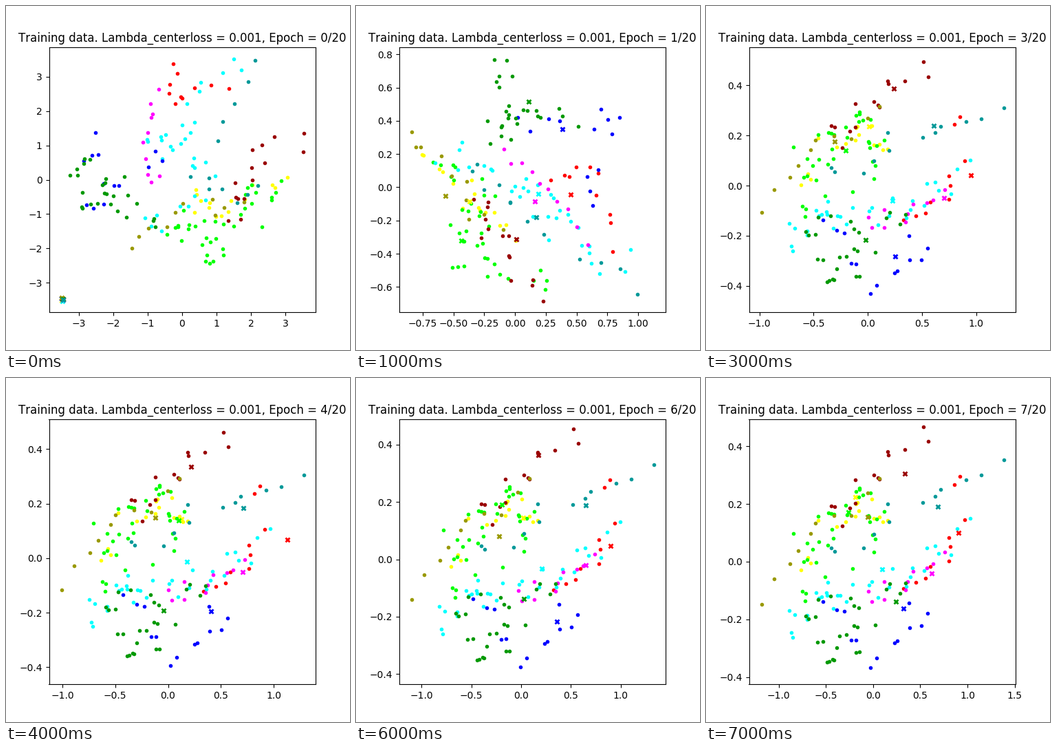
A matplotlib script that plays this animation: 500x500 px, repeating every 8 s.

```python
import numpy as np
import matplotlib.pyplot as plt
from matplotlib.animation import FuncAnimation
from matplotlib.transforms import Affine2D

plt.rcParams["text.kerning_factor"] = 6

EPOCHS = 8

# Colour and number of samples of each class, in drawing order
CLASSES = {
    "red": ("#ff0000", 10), "yellow": ("#ffff00", 15),
    "lime": ("#00ff00", 35), "cyan": ("#00ffff", 32),
    "blue": ("#0000ff", 13), "magenta": ("#ff00ff", 10),
    "maroon": ("#990000", 14), "olive": ("#999900", 10),
    "green": ("#009900", 26), "teal": ("#009999", 12),
}

# Key points of the path each class gathers along, outermost sample first.
# Stage pixels, y downwards.
START = {
    "red": [(242, 83), (243, 145), (320, 110)],
    "yellow": [(408, 248), (310, 300), (258, 258)],
    "lime": [(399, 253), (320, 315), (295, 355), (235, 300)],
    "cyan": [(341, 92), (215, 185), (285, 235), (215, 330)],
    "blue": [(129, 183), (130, 295), (232, 210)],
    "magenta": [(221, 120), (205, 190), (215, 265)],
    "maroon": [(432, 184), (340, 245), (330, 310)],
    "olive": [(182, 351), (260, 295), (345, 292)],
    "green": [(113, 221), (125, 285), (150, 262), (215, 325)],
    "teal": [(361, 78), (270, 262), (370, 270)],
}
SPREAD = {
    "red": [(372, 356), (345, 225), (290, 255)],
    "yellow": [(95, 215), (170, 285), (225, 330)],
    "lime": [(274, 411), (150, 365), (185, 300), (130, 215)],
    "cyan": [(390, 385), (295, 312), (245, 260), (130, 200)],
    "blue": [(343, 289), (370, 160), (245, 165)],
    "magenta": [(336, 346), (275, 255), (225, 215)],
    "maroon": [(271, 428), (205, 345), (180, 280)],
    "olive": [(80, 182), (145, 255), (205, 325)],
    "green": [(200, 77), (248, 150), (195, 180), (330, 160)],
    "teal": [(408, 418), (245, 295), (160, 235)],
}
SETTLED = {
    "red": [(368, 156), (350, 275), (285, 318)],
    "yellow": [(137, 264), (215, 175), (275, 195)],
    "lime": [(139, 295), (160, 215), (230, 165), (230, 250)],
    "cyan": [(123, 354), (175, 295), (270, 308), (380, 230)],
    "blue": [(169, 314), (245, 418), (325, 335)],
    "magenta": [(346, 263), (280, 302), (230, 328)],
    "maroon": [(315, 78), (245, 150), (180, 198)],
    "olive": [(80, 307), (165, 215), (245, 152)],
    "green": [(162, 310), (185, 400), (210, 352), (280, 305)],
    "teal": [(432, 140), (285, 195), (170, 250)],
}

# x and y limits of the axes at the key epochs
LIMITS = {
    0: (-3.86, 3.87, -3.86, 3.86),
    1: (-0.943, 1.223, -0.752, 0.843),
    2: (-1.065, 1.327, -0.547, 0.594),
    4: (-1.127, 1.397, -0.462, 0.509),
    6: (-1.227, 1.452, -0.435, 0.488),
    7: (-1.3136, 1.5097, -0.425, 0.494),
}


def gather(paths, seed):
    """Seeded samples around each class path; the first one stays on it."""
    rng = np.random.default_rng(seed)
    groups = {}
    for name, (_, count) in CLASSES.items():
        xs, ys = zip(*paths[name])
        along = np.linspace(0, len(xs) - 1, count)
        steps = np.arange(len(xs))
        line = np.column_stack([np.interp(along, steps, xs),
                                np.interp(along, steps, ys)])
        noise = np.clip(rng.normal(0, 1, line.shape), -1.6, 1.6)
        noise[0] = 0
        groups[name] = line + 3 * np.sqrt(count) * noise
    return groups


start, spread, settled = (gather(paths, seed) for seed, paths
                          in enumerate((START, SPREAD, SETTLED)))


def samples_at(epoch):
    if epoch < 2:
        return (start, spread)[epoch]
    # the settled cloud tilts slowly, its right side rising
    tilt = np.array([[1, 0.04 * (4 - epoch)], [0, 1]])
    pivot = (256, 252)
    return {name: (xy - pivot) @ tilt + pivot for name, xy in settled.items()}


def centers_at(epoch, groups):
    """Centres start in one corner, then wander beside their class means."""
    rng = np.random.default_rng(40 + epoch)
    wander = np.clip(rng.normal(0, 1, (len(CLASSES), 2)), -1.6, 1.6)
    if epoch == 0:
        return (82, 426) + 1.5 * wander
    means = np.array([xy.mean(axis=0) for xy in groups.values()])
    lead = (0, 0) if epoch == 1 else (40, -18)
    return means + lead + wander * (20, 14)


def limits_at(epoch):
    keys = sorted(LIMITS)
    return [np.interp(epoch, keys, [LIMITS[k][i] for k in keys])
            for i in range(4)]


fig, ax = plt.subplots(figsize=(5, 5), dpi=100)
STAGE = Affine2D().scale(1, -1).translate(0.5, 499.5)


def draw(epoch):
    ax.cla()
    groups = samples_at(epoch)
    colors = [color for color, _ in CLASSES.values()]
    for color, xy in zip(colors, groups.values()):
        ax.plot(*xy.T, ".", color=color, transform=STAGE)
    for color, (x, y) in zip(colors, centers_at(epoch, groups)):
        ax.plot([x], [y], "x", color=color, mew=2, ms=4, transform=STAGE)
    left, right, bottom, top = limits_at(epoch)
    ax.set_xlim(left, right)
    ax.set_ylim(bottom, top)
    ax.set_title("Training data. Lambda_centerloss = 0.001, "
                 f"Epoch = {epoch}/20")
    return []


anim = FuncAnimation(fig, draw, frames=EPOCHS, interval=1000, repeat=True,
                     repeat_delay=0, init_func=lambda: draw(0))
plt.show()
```
